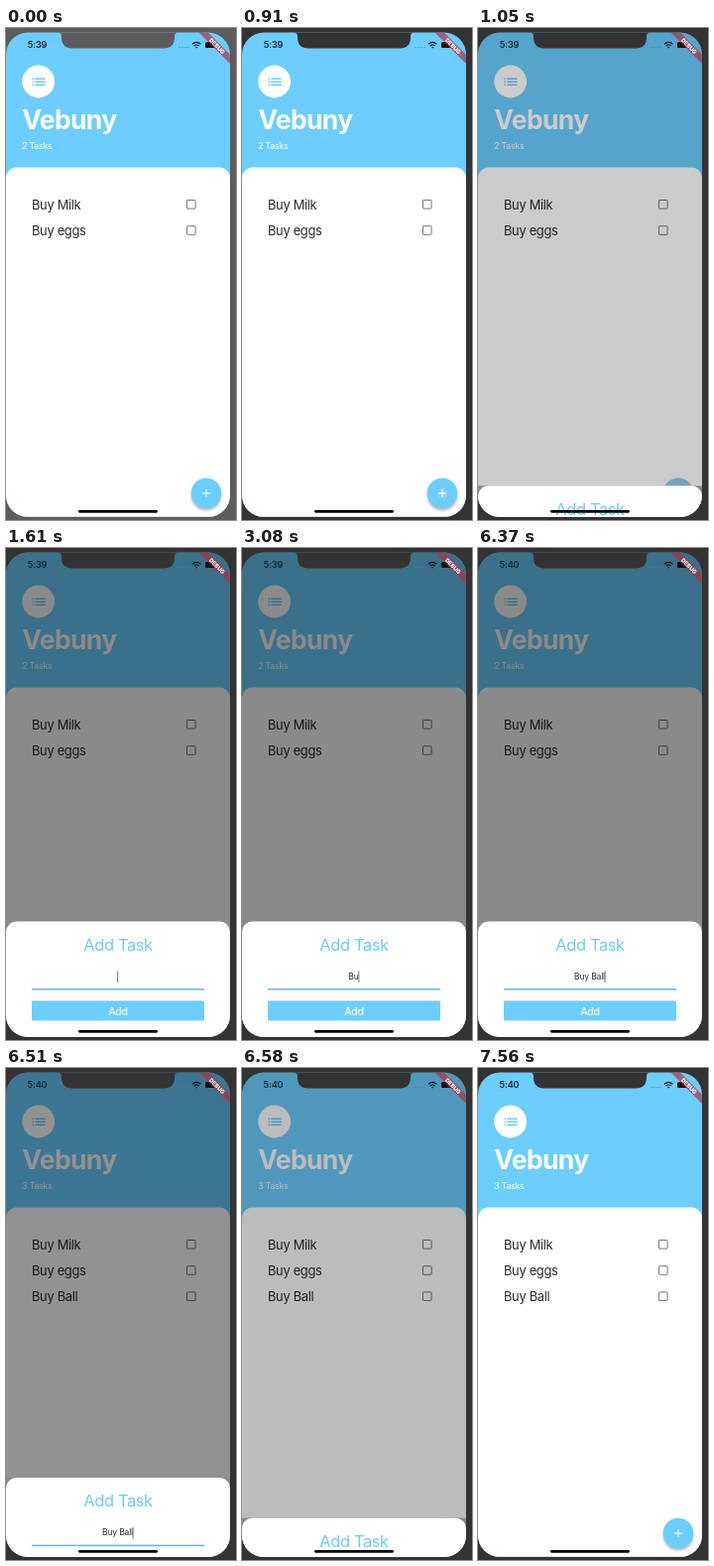
An HTML page that plays this animation: 232 px wide and 496 px high, repeating every 8 s.

```html
<!DOCTYPE html>
<html lang="en">
<head>
<meta charset="utf-8">
<title>To-do list</title>
<style>
  html, body { margin: 0; width: 100%; height: 100%; overflow: hidden; }
  svg { display: block; width: 232px; height: 496px; font-family: Inter, sans-serif; }
  text { white-space: pre; letter-spacing: -.025em; }
  .mid { text-anchor: middle; }
  .task { font-size: 12.9px; fill: #2b2b2b; }
</style>
</head>
<body>
<svg viewBox="0 0 232 496">
  <defs>
    <clipPath id="screen"><rect y="4.6" width="226" height="488.4" rx="22"/></clipPath>
    <filter id="blur" x="-50%" y="-50%" width="200%" height="200%"><feGaussianBlur stdDeviation="1.6"/></filter>
  </defs>
  <rect id="bezel" width="232" height="496"/>
  <g clip-path="url(#screen)">
    <rect width="232" height="496" fill="#6bceff"/>
    <circle cx="32.7" cy="54" r="16.4" fill="#fff"/>
    <path d="M26.5 51.2h1.6m1.2 0h10.4M26.5 54.2h1.6m1.2 0h10.4M26.5 57.2h1.6m1.2 0h10.4" stroke="#6bceff" stroke-width="1.4"/>
    <text x="16.3" y="102" font-size="26.5" font-weight="700" fill="#fff">Vebuny</text>
    <text id="count" x="16.3" y="122" font-size="8.7" fill="#fff"></text>
    <rect y="140.6" width="226" height="380" rx="11" fill="#fff"/>
    <g id="tasks"></g>
    <circle cx="202" cy="471.5" r="15" opacity=".3" filter="url(#blur)"/>
    <circle cx="202" cy="469" r="15.3" fill="#6bceff"/>
    <circle id="splash" cx="202" cy="469" fill="#c8c8c8"/>
    <path d="M198 469h8m-4-4v8" stroke="#fff"/>
    <rect id="barrier" width="232" height="496"/>
    <g id="sheet">
      <rect width="226" height="120" fill="#8a8a8a"/>
      <rect width="226" height="140" rx="11" fill="#fff"/>
      <text class="mid" x="113" y="29" font-size="16.5" fill="#70cbee">Add Task</text>
      <text id="field" class="mid" x="112.5" y="58.3" font-size="8.6" fill="#2b2b2b"></text>
      <rect id="cursor" y="50" width="1" height="11.5" fill="#5d7c96"/>
      <rect x="26" y="67.6" width="174" height="1.5" fill="#68b2e6"/>
      <rect x="26" y="80" width="174" height="20" rx="1" fill="#6bceff"/>
      <text class="mid" x="113" y="94" font-size="10.6" font-weight="500" fill="#fff">Add</text>
    </g>
    <text id="clock" class="mid" x="31.5" y="20.3" font-size="9.2" font-weight="600" fill="#132a36"></text>
    <path d="M174.5 19.5h10" stroke="#48809b" stroke-dasharray="1 2"/>
    <path d="M188 16.2q4.2-3.6 8.4 0M189.7 18q2.5-2 5 0M191.4 19.6h1.6" fill="none" stroke="#111" stroke-width="1.2"/>
    <rect x="201" y="14" width="10.5" height="6" rx="1.5" fill="#111"/>
    <g transform="translate(226 5) rotate(45)">
      <rect x="-24" y="15.3" width="48" height="6.6" fill="#b03040" opacity=".68"/>
      <text class="mid" y="20.7" font-size="5.8" font-weight="800" fill="#fff">DEBUG</text>
    </g>
    <rect x="73" y="486" width="80" height="2.7" rx="1.35"/>
  </g>
  <path id="notch" d="M52 4.5q4 0 4 4v1q0 11 11 11h92q11 0 11-11v-1q0-4 4-4z"/>
</svg>
<script>
const LOOP = 8000, TAP = 840, OPEN = 983, CLOSE = 6448, SHEET_TOP = 376.5, SHEET_HEIGHT = 116;
const $ = id => document.getElementById(id);
const set = (id, name, value) => $(id).setAttribute(name, value);
const clamp = v => Math.min(1, Math.max(0, v));

// Each entry holds from its time until the next one.
const typing = [[0, ''], [3080, 'Bu'], [3150, 'Buy'], [3360, 'Buy '], [4480, 'Buy B'],
  [4690, 'Buy Ba'], [4830, 'Buy Bal'], [4970, 'Buy Ball']];
// Cursor opacity ramps: start, duration, from, to.
const blinks = [[0, 1, 1, 1], [1720, 180, 1, 0], [2280, 180, 0, 1], [2630, 180, 1, 0],
  [3080, 1, 1, 1], [4130, 210, 1, 0], [4480, 1, 1, 1], [5670, 210, 1, 0], [6200, 150, 0, 1]];
const latest = (list, t) => list.findLast(([start]) => start <= t);

// cubic-bezier(.25, .1, .25, 1)
function ease(x) {
  let lo = 0, hi = 1;
  for (let i = 0; i < 16; i++) {
    const s = (lo + hi) / 2, r = 1 - s;
    if (.75 * s * r * r + .75 * s * s * r + s ** 3 < x) lo = s; else hi = s;
  }
  return .3 * lo * (1 - lo) ** 2 + 3 * lo * lo * (1 - lo) + lo ** 3;
}

$('tasks').innerHTML = ['Buy Milk', 'Buy eggs', 'Buy Ball'].map((name, i) =>
  `<g transform="translate(0 ${i * 26.2})"><text class="task" x="26" y="182.5">${name}</text>
  <rect x="182.5" y="173.5" width="8.6" height="8.6" rx=".5" fill="none" stroke="#777"/></g>`).join('');

function draw(t) {
  const shade = t < 560 ? '#5c5c5c' : '#333';
  set('bezel', 'fill', shade);
  set('notch', 'fill', shade);
  $('clock').textContent = t < 3990 ? '5:39' : '5:40';

  const added = t >= CLOSE - 8;
  $('count').textContent = added ? '3 Tasks' : '2 Tasks';
  $('tasks').lastElementChild.style.display = added ? '' : 'none';

  set('splash', 'r', 15.3 * clamp((t - TAP) / 200));
  set('splash', 'opacity', .4 * clamp((1250 - t) / 200));

  const shown = clamp((t - OPEN) / 255) - clamp((t - CLOSE) / 200);
  set('barrier', 'opacity', .457 * ease(shown));
  set('sheet', 'transform', `translate(0 ${SHEET_TOP + SHEET_HEIGHT * (1 - shown)})`);

  const value = latest(typing, t)[1];
  $('field').textContent = value.trimEnd();
  const width = $('field').getComputedTextLength();
  set('cursor', 'x', 112.2 + width / 2 + (value.endsWith(' ') ? 2.4 : 0));
  const [start, span, from, to] = latest(blinks, t);
  set('cursor', 'opacity', from + (to - from) * clamp((t - start) / span));
}

function frame() {
  draw(performance.now() % LOOP);
  requestAnimationFrame(frame);
}
frame();
</script>
</body>
</html>
```
